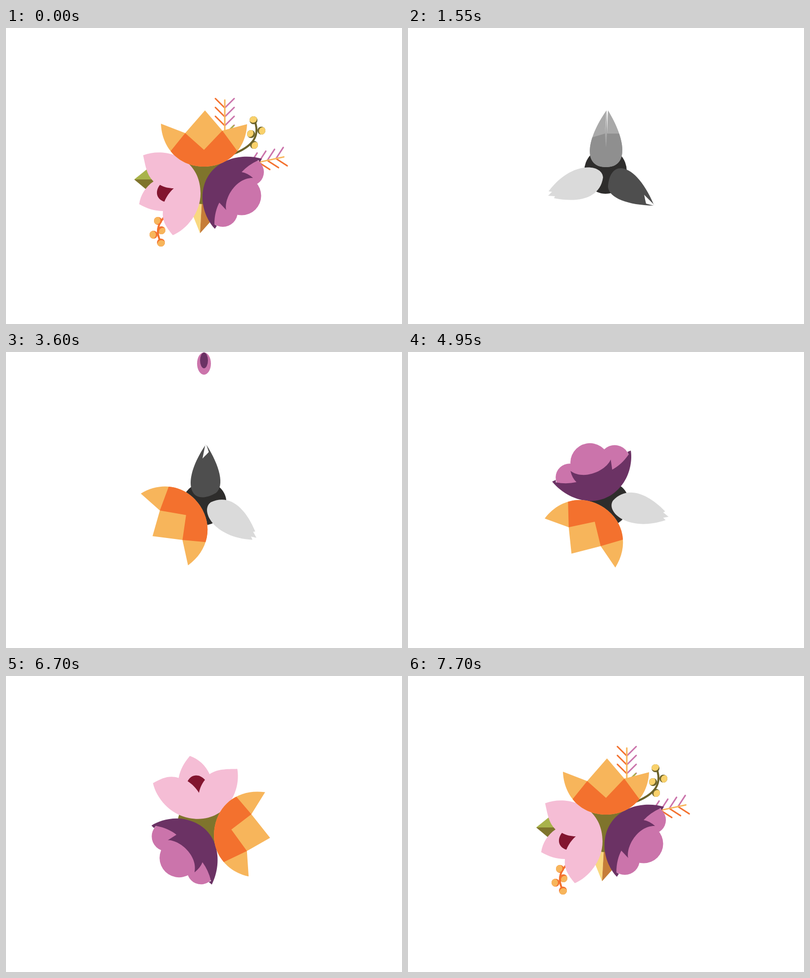
An HTML page with a canvas that plays this animation: 800x600 px, repeating every 7.8 s.

```html
<!DOCTYPE html>
<html lang="en">
<head>
<meta charset="utf-8">
<title>Blooming bouquet</title>
<style>
html, body { margin: 0; height: 100%; overflow: hidden; background: #fff; }
canvas { display: block; }
</style>
</head>
<body>
<canvas id="stage" width="800" height="600"></canvas>
<script>
const ctx = document.getElementById('stage').getContext('2d');
const LOOP = 7800, STEP = 50;
const ORANGE = '#f3712e', LIGHT = '#f7b55b', PLUM = '#6b3264', MAUVE = '#cb74ab',
      ROSE = '#f5bdd5', WINE = '#82152f', OLIVE = '#7f742c', LIME = '#a9b34b';

const clamp = v => Math.max(0, Math.min(1, v));
const span = (t, start, length) => clamp((t - start) / length);
const lerp = (a, b, p) => a + (b - a) * p;
const inOut = p => p < .5 ? 4 * p ** 3 : 1 - 4 * (1 - p) ** 3;
const out = (p, power) => 1 - (1 - p) ** power;

// Blend two paths that share the same commands.
function morph(from, to, p) {
  const target = to.match(/[\d.]+/g);
  let i = 0;
  return new Path2D(from.replace(/[\d.]+/g, v => lerp(+v, +target[i++], p)));
}

function tint(from, to, p) {
  const part = (hex, k) => parseInt(hex.slice(1 + 2 * k, 3 + 2 * k), 16);
  return `rgb(${[0, 1, 2].map(k => Math.round(lerp(part(from, k), part(to, k), p)))})`;
}

function fill(path, color) {
  ctx.fillStyle = color;
  ctx.fill(typeof path === 'string' ? new Path2D(path) : path);
}

function stroke(path, color, width) {
  ctx.strokeStyle = color;
  ctx.lineWidth = width;
  ctx.stroke(new Path2D(path));
}

function ellipse(x, y, rx, ry, color) {
  ctx.fillStyle = color;
  ctx.beginPath();
  ctx.ellipse(x, y, rx, ry, 0, 0, 7);
  ctx.fill();
}

function tulip(p, c) {
  ctx.save();
  const outline = morph(
    'M401 167 C361 224 352 282 400 282 C448 282 439 224 404 167 L402 214 L402 167 L398 215 Z',
    'M313 194 C315 245 351 281 400 281 C449 281 485 245 487 195 L437 208 L402 167 L362 213 Z', p);
  fill(outline, tint('#a9a9a9', LIGHT, c));
  ctx.clip(outline);
  fill(morph('M360 225 L371 222 L398 214 L400 243 L402 214 L428 214 L440 214 L440 290 L360 290 Z',
             'M330 252 L333 249 L362 213 L400 247 L437 208 L467 249 L470 252 L470 290 L330 290 Z', p),
       tint('#8f8f8f', ORANGE, c));
  ctx.restore();
}

function peony(p, c) {
  const petal = tint('#888888', MAUVE, c);
  for (const [x, y, r] of [[493, 292, 28], [476, 340, 39.5], [438, 373, 30]])
    ellipse(lerp(455, x, p), lerp(325, y, p), r * p, r * p, petal);
  fill(morph(
    'M497 359 C462 274 408 261 404 322 C406 345 445 359 496 360 L496 360 L481 356 C481 356 481 356 481 356 L480 352 C479 348 478 342 477 338 Q477 338 477 338 Q487 348 497 358 L497 358 Z',
    'M517 265 C465 250 397 274 397 345 C397 370 410 395 422 407 L426 401 L421 398 C421 380 425 365 431 354 L445 369 C440 345 465 303 499 304 Q488 294 476 292 Q490 277 510 268 L513 272 Z', p),
    tint('#4e4e4e', PLUM, c));
}

function lily(p, c) {
  fill(morph(
    'M284 331 C331 268 393 275 394 303 C388 345 345 355 295 345 C296 343 296 342 297 341 C292 341 287 340 283 340 C286 337 288 335 291 332 C288 332 286 331 284 331 Z',
    'M277 258 C325 240 393 265 393 335 C393 375 365 408 337 420 C322 402 315 390 317 371 C300 371 285 366 269 357 C272 338 282 322 298 311 C284 297 282 280 277 258 Z', p),
    tint('#dadada', ROSE, c));
  fill(morph('M320 325 C320 325 320 325 320 325 C320 325 320 325 320 325 C320 325 320 325 320 325 Z',
             'M311 318 C320 323 330 325 339 325 C330 333 324 342 320 352 C303 347 301 330 311 318 Z', p),
       tint('#dadada', WINE, c));
}

function feather(x, y, angle, left, right) {
  ctx.save();
  ctx.translate(x, y);
  ctx.rotate(angle * Math.PI / 180);
  for (let i = 0; i < 4; i++) {
    const base = i * 18;
    stroke(`M-1 ${base} l-18 -18`, left, 3);
    stroke(`M1 ${base} l18 -18`, right, 3);
  }
  stroke('M0 -15 V50', LIGHT, 3);
  ctx.restore();
}

// Each berry: position, then the direction its lit side leans.
function berries(stem, shade, light, list) {
  stroke(stem, shade, 4);
  for (const [x, y, dx, dy] of list) {
    ctx.save();
    ellipse(x, y, 8, 8, shade);
    ctx.clip();
    ellipse(x + dx, y + dy, 8, 8, light);
    ctx.restore();
  }
}

const sprigs = [
  () => {
    feather(442, 161, 0, ORANGE, MAUVE);
    stroke('M452 206 L460 198', LIME, 3);
  },
  () => berries('M319 384 C305 400 303 415 312 432', ORANGE, LIGHT,
    [[307, 391, -3, -1], [314, 410, 3, 3], [298, 419, -3, 0], [313, 435, 1, 3]]),
  () => {
    fill('M259 307 L290 282 L312 307 Z', LIME);
    fill('M259 307 L312 307 L290 333 Z', OLIVE);
  },
  () => {
    fill('M392 416 L368 356 L396 345 Z', '#f9d880');
    fill('M392 416 L396 345 L426 378 Z', '#c67d38');
  },
  () => berries('M460 255 C490 243 515 225 503 190', '#6b6229', '#f9d16b',
    [[500, 187, -1, -3], [516, 208, 3, 1], [495, 215, -3, -2], [501, 237, 3, 2]]),
  () => feather(546.5, 264.5, 78, MAUVE, ORANGE)
];

function drop(age, outer, inner) {
  if (age <= 0 || age > 960) return;
  const size = out(span(age, 0, 300), 3);
  const fall = Math.max(0, age - 650) ** 2 * .00192;
  ellipse(400, 1 + 22.5 * size + fall, 14 * size, 22.5 * size, outer);
  ellipse(400, 1 + 16 * size + fall, 8 * size, 16 * size, inner);
}

const drops = [
  { start: 1750, outer: LIGHT, inner: ORANGE, flower: tulip },
  { start: 3335, outer: MAUVE, inner: PLUM, flower: peony },
  { start: 5290, outer: ROSE, inner: WINE, flower: lily }
];

function draw(t) {
  ctx.fillStyle = '#fff';
  ctx.fillRect(0, 0, 800, 600);
  ctx.lineCap = 'round';
  for (const d of drops) drop(t - d.start, d.outer, d.inner);

  const second = inOut(span(t, 4800, 438));
  const angle = -123.6 * inOut(span(t, 3107, 415)) - 135.7 * second
              - 100.7 * inOut(span(t, 6700, 415));
  const cx = lerp(404.3, 401, second), cy = lerp(298.5, 302, second);
  const close = 1 - inOut(span(t, 950, 600));
  const bloom = d => Math.max(close, out(span(t, d.start + 910, 380), 2));
  const color = d => Math.max(close, span(t, d.start + 890, 130));

  ctx.save();
  ctx.translate(cx, cy);
  ctx.rotate(angle * Math.PI / 180);
  ctx.translate(-cx, -cy);

  sprigs.forEach((sprig, i) => {
    const s = t < 1750 ? 1 - inOut(span(t, 950, 380))
                       : out(span(t, 6800 + i * 50, 620), 4);
    if (s <= 0) return;
    ctx.save();
    ctx.translate(400, 300);
    ctx.scale(s, s);
    ctx.translate(-400, -300);
    sprig();
    ctx.restore();
  });

  const core = bloom(drops[2]);
  ellipse(399, lerp(290, 300, core), lerp(43, 57, core), lerp(46, 57, core),
          tint('#2e2d2c', OLIVE, core));
  for (const d of [...drops].reverse()) d.flower(bloom(d), color(d));
  ctx.restore();
}

function frame() {
  const t = performance.now() % LOOP;
  draw(Math.floor(t / STEP) * STEP);
  requestAnimationFrame(frame);
}
frame();
</script>
</body>
</html>
```
